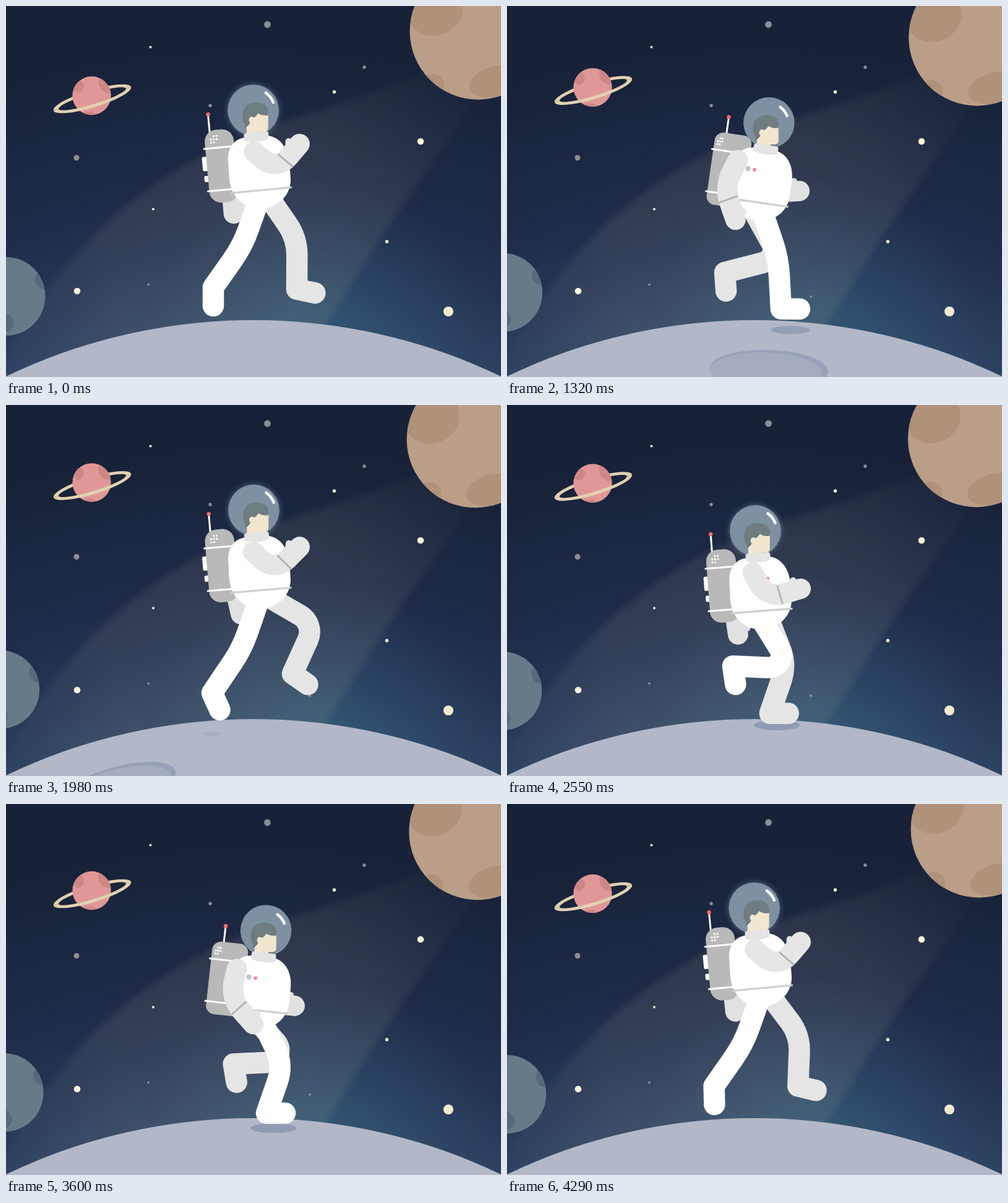
Recreate the animation shown at these times as an HTML page with a canvas. Size 800 px wide and 600 px high, loop 4.32 s.

```html
<!DOCTYPE html>
<html lang="en">
<head>
<meta charset="utf-8">
<title>Moonwalk</title>
<style>
html, body { margin: 0; width: 100%; height: 100%; overflow: hidden; background: #1a2540; }
canvas { display: block; width: 800px; height: 600px; }
</style>
</head>
<body>
<canvas id="stage" width="800" height="600"></canvas>
<script>
const LOOP = 4320, STRIDE = 2160, TAU = Math.PI * 2, RAD = TAU / 360;
const stage = document.getElementById('stage');
let ctx = stage.getContext('2d');

const clamp = (v, lo, hi) => Math.max(lo, Math.min(hi, v));
const polar = ([x, y], r, deg) => [x + r * Math.cos(deg * RAD), y + r * Math.sin(deg * RAD)];
// Cosine of a cycle that peaks at the given phase.
const wave = (p, peak) => Math.cos((p - peak) * TAU);

// Smooth closed curve through rows of [phase, ...values].
function spline(rows, period) {
  const n = rows.length;
  const row = i => rows[(i + n) % n];
  const at = i => row(i)[0] + Math.floor(i / n) * period;
  return p => {
    let i = n - 1;
    while (i > 0 && rows[i][0] > p) i--;
    const h = at(i + 1) - at(i), u = (p - at(i)) / h, v = 1 - u;
    return row(i).slice(1).map((a, k) => {
      const b = row(i + 1)[k + 1];
      const m0 = (b - row(i - 1)[k + 1]) / (at(i + 1) - at(i - 1)) * h;
      const m1 = (row(i + 2)[k + 1] - a) / (at(i + 2) - at(i)) * h;
      return a * v * v * (1 + 2 * u) + m0 * u * v * v + b * u * u * (3 - 2 * u) - m1 * u * u * v;
    });
  };
}

// Path of the ankle over one stride, shared by both legs: phase, x, y, foot angle.
const ankle = spline([
  [0, 470, 458, 12], [.192, 421, 500, 0], [.319, 364, 492, 10], [.417, 336, 475, 40],
  [.5, 335, 455, 90], [.624, 352, 431, 86], [.819, 404, 406, 68], [.917, 448, 415, 57]
], 1);
// Height of the torso over one step.
const bob = spline([[0, 269], [.124, 289], [.192, 305], [.319, 290], [.417, 275.5]], .5);

function fill(color, draw) {
  ctx.fillStyle = color;
  ctx.beginPath();
  draw();
  ctx.fill();
}
function ellipse(x, y, rx, ry, color, deg = 0) {
  fill(color, () => ctx.ellipse(x, y, rx, ry, deg * RAD, 0, TAU));
}
const disc = (x, y, r, color) => ellipse(x, y, r, r, color);
function box(x, y, w, h, r, color) {
  fill(color, () => ctx.roundRect(x, y, w, h, r));
}
function line(x1, y1, x2, y2, w, color, cap = 'round') {
  ctx.strokeStyle = color;
  ctx.lineWidth = w;
  ctx.lineCap = cap;
  ctx.beginPath();
  ctx.moveTo(x1, y1);
  ctx.lineTo(x2, y2);
  ctx.stroke();
}
function radial(x, y, r0, r1, ...colors) {
  const g = ctx.createRadialGradient(x, y, r0, x, y, r1);
  colors.forEach((c, i) => g.addColorStop(i / (colors.length - 1), c));
  return g;
}

function makeSky() {
  const c = document.createElement('canvas');
  c.width = 800;
  c.height = 600;
  const main = ctx;
  ctx = c.getContext('2d');
  const wash = g => fill(g, () => ctx.rect(0, 0, 800, 600));
  wash(radial(400, 1433, 925, 1365, '#2e4262', '#243454', '#1f2a47', '#1b2640', '#172238'));
  wash(radial(500, 550, 0, 270, 'rgba(55,112,138,.45)', 'rgba(55,112,138,.2)', 'rgba(55,112,138,0)'));

  ctx.filter = 'blur(5px)';
  fill(radial(400, 420, 0, 470, 'rgba(255,235,190,.095)', 'rgba(255,235,185,.08)', 'rgba(255,235,180,0)'), () => {
    ctx.moveTo(514, 520);
    ctx.lineTo(605, 375);
    ctx.lineTo(775, 130);
    ctx.lineTo(700, 95);
    ctx.bezierCurveTo(580, 155, 440, 180, 330, 235);
    ctx.bezierCurveTo(200, 300, 60, 420, -10, 600);
    ctx.lineTo(500, 600);
  });
  ctx.filter = 'none';

  const stars = (color, list) => list.forEach(s => disc(...s, color));
  stars('#fdf8de', [[233.5, 66.5, 2], [530.5, 139, 2.7], [670, 219, 5.3],
    [238, 328.5, 2], [615.5, 381, 2.7], [115, 461, 5.3]]);
  stars('#8b8e93', [[422.5, 30, 5.4], [579, 99, 2.7], [330, 161, 2.7],
    [114, 245.5, 4.5], [230, 450.5, 1.9], [491, 470, 2]]);
  disc(715, 494, 8, '#f3ead0');
  ctx = main;
  return c;
}

// Disc with spots cut off at its rim; spots are relative to the centre.
function planet(x, y, r, color, spotColor, spots) {
  ctx.save();
  ctx.translate(x, y);
  disc(0, 0, r, color);
  ctx.clip();
  spots.forEach(([sx, sy, rx, ry, deg]) => ellipse(sx, sy, rx, ry, spotColor, deg));
  ctx.restore();
}

function ring(x, y, front) {
  ctx.save();
  ctx.translate(x, y);
  ctx.rotate(-17 * RAD);
  ctx.beginPath();
  ctx.rect(-80, front ? 0 : -40, 160, 40);
  ctx.clip();
  ctx.fillStyle = '#e2d0b0';
  ctx.beginPath();
  ctx.ellipse(0, 0, 65.5, 14, 0, 0, TAU);
  ctx.ellipse(0, 0, 57, 8.8, 0, 0, TAU);
  ctx.fill('evenodd');
  ctx.restore();
}

function planets(p) {
  const c = wave(p, 0), y = 135 + 10 * c;
  ring(139.5, y + 5, false);
  planet(138.5, y, 31.2, '#e09797', '#cf8686',
    [[-21, -14, 8, 10, 25], [23, -18, 11, 15, -35], [-4, 34, 14, 8, 0]]);
  ring(139.5, y + 5, true);
  planet(760.5 + 2.5 * c, 48.5 - 7.5 * c, 110.4, '#ba9e87', '#b0917a',
    [[-69, -33, 45, 39, -25], [30, 81, 45, 25, -14], [-74, 87, 19, 18, 0]]);
  const d = -9.4 * Math.min(p / .46, (1 - p) / .54);
  planet(d, 469.5 + d, 63.5, '#677a88', '#576a7c',
    [[63, -26, 17, 15, 30], [-6, 42, 19, 16, 20]]);
}

function ground(t) {
  disc(400, 1433, 925, '#b2b8c7');
  // the crater rolls past, gaining speed
  const s = t - 1320, deg = 1.56 - .02268 * s - 3.65e-6 * s * s;
  if (Math.abs(deg) > 23) return;
  ctx.save();
  ctx.translate(400, 1433);
  ctx.rotate(deg * RAD);
  ellipse(0, -845, 96, 32, '#97a2b8');
  ctx.clip();
  ellipse(-5, -841, 92, 32, '#a5acbf');
  ctx.restore();
}

function shadow(g) {
  const u = g % .5, near = g >= .5;
  const size = clamp(Math.min(u / .145, (.49 - u) / .09), 0, 1);
  const y = near ? 524 + Math.max(0, u - .19) * 30 : 518;
  ctx.globalAlpha = size;
  ellipse(458 - 380 * (u - .124), y, 37 * size, 8 * size, '#8f9cb4');
  ctx.globalAlpha = 1;
}

// Thick line with a rounded bend at the second point.
function limb(pts, w, color) {
  const [[x0, y0], [x1, y1], [x2, y2]] = pts;
  const ax = x0 - x1, ay = y0 - y1, bx = x2 - x1, by = y2 - y1;
  const la = Math.hypot(ax, ay), lb = Math.hypot(bx, by);
  const cos = clamp((ax * bx + ay * by) / la / lb, -.9999, .9999);
  const tan = Math.tan(Math.acos(cos) / 2);
  const cut = Math.min(Math.max(20 / tan, 28), .9 * Math.min(la, lb));
  ctx.strokeStyle = color;
  ctx.lineWidth = w;
  ctx.lineCap = ctx.lineJoin = 'round';
  ctx.beginPath();
  ctx.moveTo(x0, y0);
  ctx.arcTo(x1, y1, x2, y2, cut * tan);
  pts.slice(2).forEach(q => ctx.lineTo(...q));
  ctx.stroke();
}

// The knee bulges forward so that the leg keeps its length.
function leg(hip, phase, color) {
  const [x, y, turn] = ankle(phase % 1);
  const dx = x - hip[0], dy = y - hip[1], d = Math.hypot(dx, dy);
  const bulge = 1.25 * Math.sqrt(Math.max(80, 81 * 81 - d * d / 4));
  const knee = [hip[0] + dx / 2 + dy / d * bulge, hip[1] + dy / 2 - dx / d * bulge];
  limb([hip, knee, [x, y], polar([x, y], 30, turn)], 34.5, color);
}

// The elbow closes as the upper arm swings forward.
function arm(shoulder, upper, color, cuff) {
  const fore = 1.55 * upper - 112;
  const elbow = polar(shoulder, 48, upper), hand = polar(elbow, 57, fore);
  limb([shoulder, elbow, hand], 33, color);
  const near = (a, b) => polar(polar(hand, a, fore), b, fore - 90);
  line(...near(-24, 4), ...near(-8, 16.5), 10, color);
  if (cuff) line(...near(-35, 15.5), ...near(-35, -15.5), 3, '#b4b4b4', 'butt');
}

function pack(yaw) {
  const turn = Math.max(0, yaw), knob = 2 + 5 * yaw;
  if (knob > 0) {
    box(-84 - knob, -33, knob + 3, 23, 2.5, '#fff');
    box(-83 - knob, -2, knob + 3, 10, 2.5, '#fff');
  }
  const ax = -66.5 - 8 * turn;
  line(ax, -70, ax, -100, 3, '#fff', 'butt');
  disc(ax, -101, 3.2, '#fb6a6a');
  box(-84, -75, 53.5 - 6.5 * yaw, 118, 14 + 5 * turn, '#b9b9b9');
  // three rows of dots without the two outer corners
  const gap = 4.2 + .6 * yaw;
  for (let i = 1; i < 8; i++) {
    disc(-72 + 3 * yaw + (i % 3 - 1) * gap, -60 + (Math.floor(i / 3) - 1) * 5, 1.6, '#fff');
  }
  line(-86, -46, -42, -46, 3, '#fff');
  line(-86, 23, -40, 23, 3, '#fff');
}

function torso(yaw) {
  fill('#fff', () => {
    ctx.moveTo(-20, -58);
    ctx.lineTo(16, -58);
    ctx.bezierCurveTo(35, -56, 49, -38, 49, -12);
    ctx.lineTo(49, 12);
    ctx.bezierCurveTo(49, 40, 25, 59, 0, 59);
    ctx.bezierCurveTo(-28, 59, -50, 38, -50, 5);
    ctx.lineTo(-49, -22);
    ctx.bezierCurveTo(-49, -44, -36, -57, -20, -58);
  });
  line(-48, 29, 48, 29, 3.2, '#cfcfcf');
  const x = -10 + 14 * yaw;
  ellipse(x, -23, 3.9, 4.2, '#b9c5cf');
  disc(x + 10.7, -22.5, 2.8, '#ff7ba5');
}

function head(x, y, yaw) {
  ctx.save();
  ctx.translate(x, y);
  ctx.shadowColor = `rgba(190,210,235,${Math.max(0, .18 + .22 * yaw)})`;
  ctx.shadowBlur = 10;
  disc(0, 0, 41.3, '#7f90a2');
  ctx.shadowColor = 'transparent';
  ctx.strokeStyle = '#fff';
  ctx.lineWidth = 4.5;
  ctx.lineCap = 'round';
  ctx.beginPath();
  ctx.arc(0, 0, 33 + 1.7 * yaw, -.95, -.37);
  ctx.stroke();

  ctx.translate(-4.3 + 4.3 * yaw, 0);
  box(11, 34, 11, 4, 1, '#667c8a');
  box(-11, 18, 22, 24, 0, '#f2e6cf');
  box(-8, 2, 32, 33, [0, 0, 6, 0], '#f2e6cf');
  fill('#6f7d80', () => {
    ctx.moveTo(-11, 27);
    ctx.bezierCurveTo(-18, 20, -20, 2, -13, -5);
    ctx.bezierCurveTo(-6, -15, 12, -15, 20, -7);
    ctx.bezierCurveTo(24, -3, 25, 2, 24, 8);
    ctx.quadraticCurveTo(15, 10, 8, 5);
    ctx.quadraticCurveTo(5, 10, 1, 12);
    ctx.quadraticCurveTo(-3, 9, -6, 12);
    ctx.quadraticCurveTo(-9, 17, -5, 20);
    ctx.lineTo(-11, 27);
  });
  line(-13, 27, -7, 22, 1.6, '#5d6b70');
  ctx.restore();
}

function collar() {
  fill('#e4e4e4', () => {
    ctx.moveTo(-16, -65);
    ctx.lineTo(16, -65);
    ctx.quadraticCurveTo(20, -65, 20, -61);
    ctx.lineTo(20, -54);
    ctx.bezierCurveTo(16, -48, -16, -48, -20, -54);
    ctx.lineTo(-20, -61);
    ctx.quadraticCurveTo(-20, -65, -16, -65);
  });
}

function astronaut(g) {
  const cx = 410, [cy] = bob(g % .5);
  const lean = Math.max(-5.3, 1.2 - 7.6 * wave(g, .06)), a = lean * RAD;
  const yaw = clamp((1.5 - lean) / 6.7, -1, 1);
  const place = (x, y) => [cx + x * Math.cos(a) - y * Math.sin(a), cy + x * Math.sin(a) + y * Math.cos(a)];
  const upright = draw => {
    ctx.save();
    ctx.translate(cx, cy);
    ctx.rotate(a);
    draw(yaw);
    ctx.restore();
  };

  arm(place(-15, -30), 100 + 31 * wave(g, .08), '#e1e1e1', false);
  upright(pack);
  leg(place(1 + 9 * yaw, 40), g, '#e5e5e5');
  leg(place(2 - 6 * yaw, 41), g + .5, '#fff');
  upright(torso);
  head(...place(-1, -101), yaw);
  upright(collar);
  arm(place(-32 + 18 * yaw + 8 * yaw * yaw, -34), 84 - 44 * wave(g, .015), '#e6e6e6', true);
}

// The second step of each stride runs a little ahead towards its end.
function gait(p) {
  const w = Math.max(0, 2 * p - 1);
  return p + .34 * w * w * (1 - w);
}

const sky = makeSky();

function frame() {
  const t = Math.floor(performance.now() % LOOP / 30) * 30;
  const g = gait(t % STRIDE / STRIDE);
  ctx.drawImage(sky, 0, 0);
  planets(t / LOOP);
  ground(t);
  shadow(g);
  astronaut(g);
  requestAnimationFrame(frame);
}
frame();
</script>
</body>
</html>
```
